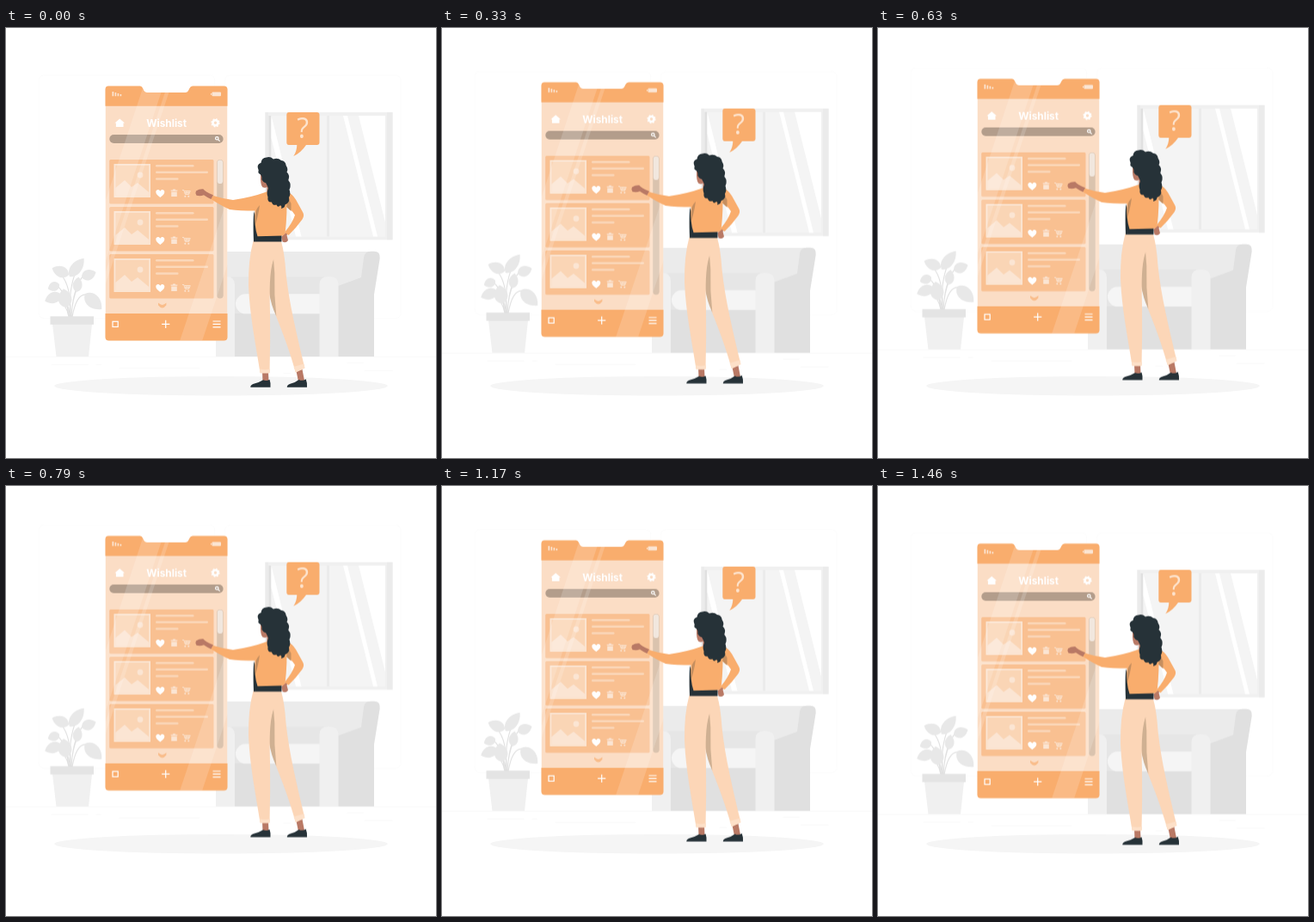
Animation, 500 px wide and 500 px high, one loop 1500 ms. Source, as an HTML page:

```html
<!DOCTYPE html>
<html lang="en">
<head>
<meta charset="utf-8">
<title>Wishlist</title>
<style>
html, body { margin: 0; width: 100%; height: 100%; overflow: hidden; background: #fff; }
svg { display: block; width: 100vw; height: 100vh; }
.float { animation: float 1.5s linear infinite; }
@keyframes float { 50% { transform: translateY(-10px); } }
.main { fill: #f9ad6d; }
.dark { fill: #263238; }
.skin { fill: #b97965; }
.pants { fill: #fcd6b7; }
.white { fill: #fff; }
.pale { fill: #fbe5d3; }
.line { fill: none; stroke: #fff; stroke-width: 1.2; }
.title { font: 700 11.8px Inter, sans-serif; fill: #fff; text-anchor: middle; }
.ask { font: 400 32px "Open Sans", sans-serif; fill: #fde3cd; text-anchor: middle; }
</style>
</head>
<body>
<svg viewBox="0 0 500 500">
<defs>
  <path id="leaf" d="M0 0C-8-3-10-14 0-22C10-14 8-3 0 0Z"/>
  <path id="phone" d="M119 67.5H156Q158 67.5 159 70L160.500 73Q161.500 75 164 75H208.500Q211 75 212 73L213.500 70Q214.500 67.500 217 67.500H253.500Q257.500 67.500 257.500 71.500V359.500Q257.500 363.500 253.500 363.500H119.500Q115.500 363.500 115.500 359.500V71.500Q115.500 67.500 119 67.500Z"/>
  <clipPath id="screen"><use href="#phone"/></clipPath>
  <g id="card">
    <rect x="120.200" y="153" width="121.300" height="51.500" rx="1.500" fill="#f9c091"/>
    <rect x="125.500" y="158" width="42.500" height="39" class="pale"/>
    <rect x="127.300" y="159.800" width="38.900" height="35.400" fill="#fad5b5"/>
    <path d="M127.300 186L138 177L146 185L153 180L166.200 191V195.200H127.300Z" class="pale"/>
    <circle cx="156" cy="171" r="3.400" class="pale"/>
    <g fill="#fbd8ba">
      <rect x="174" y="159" width="44.500" height="2.400" rx="1.200"/>
      <rect x="174" y="166.500" width="61" height="2.400" rx="1.200"/>
      <rect x="174" y="174.300" width="26.500" height="2.400" rx="1.200"/>
    </g>
    <path d="M179.300 197C176 194.500 174.300 193 174.300 190.700C174.300 187.700 178 187.200 179.300 189.800C180.600 187.200 184.300 187.700 184.300 190.700C184.300 193 182.600 194.500 179.300 197Z" class="white"/>
    <g class="pale">
      <path d="M191.700 188.500H194V187.600H197V188.500H199.300V189.800H191.700ZM192.200 190.500H198.800V196H192.200Z"/>
      <circle cx="208.300" cy="195.700" r="1"/>
      <circle cx="212.300" cy="195.700" r="1"/>
    </g>
    <path d="M205 188.500H206.800L208.300 193.500H212.700L214.200 189.500H207.500M208 191.500H213.500M209.500 189.500V193M211.700 189.500V193" fill="none" stroke="#fbe5d3" stroke-width=".9"/>
  </g>
</defs>

<ellipse cx="250" cy="416.240" rx="193.890" ry="11.320" fill="#f5f5f5"/>

<g class="float">
  <g fill="none" stroke="#f5f5f5" stroke-width=".35">
    <rect x="38.300" y="55" width="204.400" height="282.700" rx="5.700"/>
    <rect x="254.600" y="55" width="204.400" height="282.700" rx="5.700"/>
  </g>
  <path d="M0 382.400H500v.25H0ZM416.800 398.500h33.100v.25h-33.100ZM322.500 401.200h8.700v.25h-8.700ZM396.600 389.200h19.200v.25h-19.200ZM52.500 390.900h43.200v.25H52.500ZM104.600 390.900h6.300v.25h-6.300ZM131.500 395.100h93.700v.25h-93.700Z" fill="#ebebeb"/>

  <!-- window -->
  <rect x="301.500" y="98" width="148" height="148.300" fill="#f0f0f0"/>
  <path d="M301.500 98H305V246.300H301.500ZM443 98H449.500V246.300H443Z" fill="#ebebeb"/>
  <rect x="305.500" y="102" width="3" height="140.500" fill="#e0e0e0"/>
  <rect x="308.500" y="102" width="132.500" height="140.500" fill="#f4f4f4"/>
  <path d="M308.500 102L343.500 242.500H337L308.500 128ZM392 102H397L432 242.500H427ZM410 102H441V226Z" class="white"/>
  <path d="M373 102H376V242.500H373Z" fill="#ebebeb"/>

  <!-- sofa -->
  <path d="M250 292V266Q250 260 256 260H424L420 320H250Z" fill="#ebebeb"/>
  <path d="M386 382V300L413 290L416 267Q417 259.800 424 259.800H428Q435.500 259.800 434.700 268L428 310V382Z" fill="#e0e0e0"/>
  <rect x="262" y="289.500" width="108" height="92.500" fill="#e6e6e6"/>
  <rect x="262" y="332" width="106" height="50" fill="#e0e0e0"/>
  <rect x="267" y="309.300" width="110" height="23" rx="11.500" fill="#f5f5f5"/>
  <path d="M244 382V298Q244 289 255 289Q266 289 266 298V382ZM364.500 382V298Q364.500 289 375.500 289Q386.500 289 386.500 298V382Z" fill="#f0f0f0"/>

  <!-- plant -->
  <g fill="none" stroke="#e0e0e0" stroke-width="1.100">
    <path d="M75 336Q72 305 82 281M75 336Q76 300 64 287M76 336Q78 300 91 287M73 336Q70 306 58 299M76 336Q77 315 83 302M73 336Q70 320 60 315M77 336Q82 308 94 310M74 336Q74 325 69 318"/>
  </g>
  <g fill="#e8e8e8">
    <use href="#leaf" transform="translate(74 289) rotate(38) scale(.95 1.220)"/>
    <use href="#leaf" transform="translate(73 287) rotate(-68) scale(.95)"/>
    <use href="#leaf" transform="translate(88 290) rotate(70) scale(.9 .8)"/>
    <use href="#leaf" transform="translate(62 298) rotate(-112) scale(.8 .65)"/>
    <use href="#leaf" transform="translate(82 307) rotate(8) scale(.8)"/>
    <use href="#leaf" transform="translate(64 310) rotate(-112) scale(.95 .92)"/>
    <use href="#leaf" transform="translate(70 325) rotate(-8) scale(1.150 1)"/>
    <use href="#leaf" transform="translate(92 309) rotate(133) scale(1.150 1.200)"/>
  </g>
  <path d="M54 344H100L96 382H58.500Z" fill="#f0f0f0"/>
  <rect x="51.500" y="335.300" width="50.500" height="9.500" fill="#e4e4e4"/>

  <!-- phone -->
  <g clip-path="url(#screen)">
    <use href="#phone" fill="#fbddc5"/>
    <path d="M115 67H258V90.800H115ZM115 332H258V364H115Z" class="main"/>
    <g class="pale">
      <path d="M123.500 74H125.200V79.300H123.500ZM126.600 75H128.200V79.300H126.600ZM129.600 76H131.200V79.300H129.600ZM132.600 77H134.200V79.300H132.600Z"/>
      <rect x="239.500" y="74.500" width="10.500" height="4.800" rx="1"/>
      <rect x="238" y="76" width="1" height="1.800"/>
    </g>
    <path d="M132.200 105.500L138 110.600H136.500V115H127.900V110.600H126.500Z" class="white"/>
    <circle cx="243.500" cy="110.300" r="3" fill="none" stroke="#fff" stroke-width="2.600"/>
    <circle cx="243.500" cy="110.300" r="4.500" fill="none" stroke="#fff" stroke-width="1.200" stroke-dasharray="1.767"/>
    <text x="186.700" y="114.700" class="title">Wishlist</text>
    <rect x="120.300" y="124" width="132.300" height="10" rx="5" fill="#b39d8b"/>
    <circle cx="245.300" cy="128.300" r="1.700" class="line"/>
    <path d="M246.500 129.600L248.700 131.700" class="line"/>
    <use href="#card"/>
    <use href="#card" y="55"/>
    <use href="#card" y="110"/>
    <rect x="245.200" y="153" width="7.500" height="161.500" rx="3.700" fill="#dac3ae"/>
    <rect x="245.800" y="153.600" width="6.300" height="27.500" rx="3.100" fill="#f1e7de"/>
    <path d="M177 319.600Q179.500 322 181.700 322Q184 322 186.400 319.600V322.300Q184 325.600 181.700 325.600Q179.500 325.600 177 322.300Z" fill="#f9bd8b"/>
    <g class="line">
      <rect x="124" y="341.300" width="6.200" height="6.200"/>
      <path d="M185.700 339.800V349M181.100 344.400H190.300M240.500 341H249.500M240.500 344.400H249.500M240.500 347.800H249.500"/>
    </g>
    <path d="M160 67L115 203V274L183 67ZM187.500 67L115 286V300L192 67ZM202 364L258 197V274L228 364Z" class="white" opacity=".16"/>
  </g>

  <!-- speech bubble -->
  <path d="M329 98H361.500Q364.500 98 364.500 101V133Q364.500 136 361.500 136H349Q343 145 334.300 149Q338.300 143 338.300 136H329Q326.300 136 326.300 133V101Q326.300 98 329 98Z" class="main"/>
  <text x="345" y="127.700" class="ask">?</text>

  <!-- woman -->
  <path d="M298 400L305 400L305.500 411L298.500 411ZM337.500 399L344.500 397L347 410L340 411Z" class="skin"/>
  <path d="M284.300 417.700Q284 415 288 413.700Q295 412 299 409.300Q303 411 306.500 408.800Q308 413 307.500 417.700ZM326.800 417.700Q326.500 415 330.500 413.700Q337 412 340.500 409Q345 411 348.700 408.300Q350.500 413 350 417.700Z" class="dark"/>
  <path d="M300 248H320Q324 262 325.500 285C329 320 339 360 347.300 395L336.800 400.500C330 376 322 355 314 335L300 290Z" class="pants"/>
  <path d="M311 268Q305 285 306 307Q308 322 314.300 335Q311.500 310 312.300 285Z" fill="#cfb092"/>
  <path d="M287.500 247.500H320L311 269C306 285 306.500 305 307 330Q307.500 365 306.500 401H295.500C290 365 283.500 335 282 300Q281.500 270 287.500 247.500Z" class="pants"/>
  <path d="M295 396.500Q301 398 307 396.500L306.500 401.500H295.800ZM334.500 394L346.500 390.500L347.500 395.500L337 400.500Z" fill="#fde0c8"/>

  <path d="M320.500 243Q324 237 329 236.500L326.500 241L328 247Q325.500 250.500 321.500 248.500Z" class="skin"/>
  <path d="M326 189.500Q333 193 337 199.500L345 214Q347.500 218 344.500 222.500Q337 233 328.500 241L324 237.500Q333 227 336 217.500Q332 211 325 206Z" class="main"/>
  <path d="M325.500 193L331.500 204L331.500 213L325 207Z" fill="#c68f5f"/>
  <path d="M288.500 213Q287 222 288 248.500H320.500V241H293.500Z" class="dark"/>
  <path d="M241 195Q252 198.500 264 200Q285 197 303 190.500H326Q327.500 215 324.500 239.500L322 241.500L292.500 242.300Q288.500 231 289.500 212.500Q272 212.500 260 211Q247 205 238 198.500Z" class="main"/>
  <path d="M295 206Q290 211 289 219.500L290 228Q293 220 295 206Z" fill="#c68f5f"/>
  <path d="M241 194.300L238.300 199Q233 196.500 230 194.300Q226 196 221.500 194.800Q219.500 192 221 189.500Q224.500 187 229.300 187.300Q232 190.700 241 194.300Z" class="skin"/>
  <path d="M296 170Q295.500 183 298.500 185.300Q301.500 186.300 303.500 185L303.300 191Q307 195 313 191V168Z" class="skin"/>
  <path d="M297.300 176Q298 172 295.500 170Q292.500 169 293.700 165.500Q290.500 159 296.500 156.800Q297 151 303 150.500Q307 149 311 152.500Q316 150.500 320 154Q325 154.500 325.700 160Q328.500 164 326.500 167.500Q330.500 171 328.300 177Q332.500 182 329.500 188Q331.500 193 329 197Q330.500 203 324.500 205.500Q324.500 209 320 210Q321 207 319 206.300Q316 209.500 314.500 205.500Q310 207 309 202.500Q303.500 203 304.500 196.500Q302.500 192 305 186.500Q304.500 184.500 302 180Q299.500 180 297.300 176Z" class="dark"/>
</g>
</svg>
</body>
</html>
```
